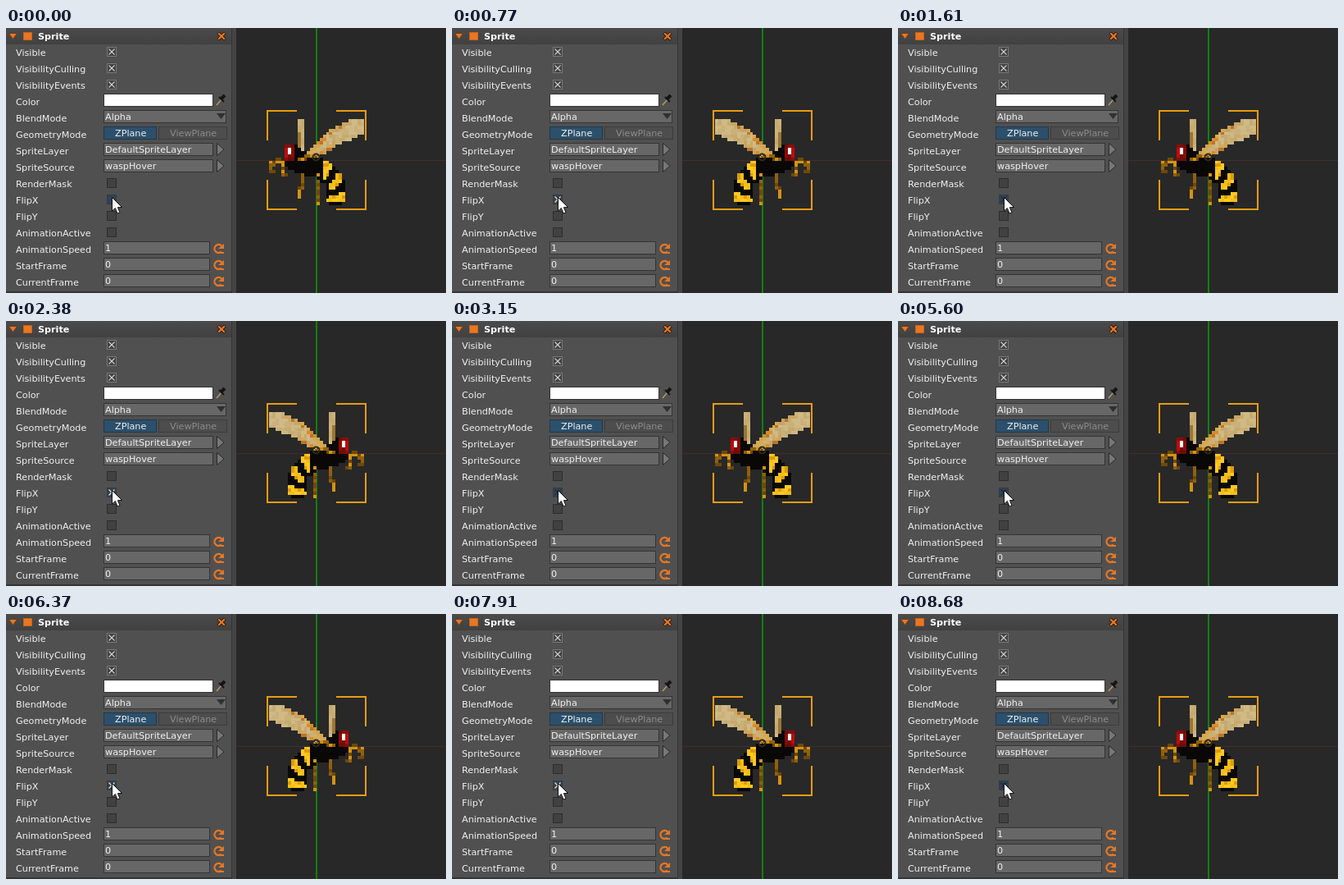
Animation of 537 by 323 pixels, one loop 9.24 s. Source, as an HTML page with a canvas:

```html
<!DOCTYPE html>
<html lang="en">
<head>
<meta charset="utf-8">
<title>Sprite flip</title>
<style>
  html, body { margin: 0; width: 100%; height: 100%; overflow: hidden; background: #282828; }
  canvas { display: block; }
</style>
</head>
<body>
<canvas id="stage" width="537" height="323"></canvas>
<script>
const ctx = document.getElementById('stage').getContext('2d');
const LOOP = 9240;
const TOGGLES = [770, 1610, 2380, 3150, 3990, 5600, 6370, 7140, 7910, 8680];
const ORANGE = '#e87722', DARK = '#343434', FILL = '#676767';
const CENTER = { x: 379, y: 161 };
const ROW = 20, LEFT = 119;

const ROWS = [
  ['Visible', 'check', true],
  ['VisibilityCulling', 'check', true],
  ['VisibilityEvents', 'check', true],
  ['Color', 'color'],
  ['BlendMode', 'menu', 'Alpha'],
  ['GeometryMode', 'choice'],
  ['SpriteLayer', 'link', 'DefaultSpriteLayer'],
  ['SpriteSource', 'link', 'waspHover'],
  ['RenderMask', 'check', false],
  ['FlipX', 'flip'],
  ['FlipY', 'check', false],
  ['AnimationActive', 'check', false],
  ['AnimationSpeed', 'number', '1'],
  ['StartFrame', 'number', '0'],
  ['CurrentFrame', 'number', '0'],
];

function rect(color, x, y, w, h) {
  ctx.fillStyle = color;
  ctx.fillRect(x, y, w, h);
}

function box(border, fill, x, y, w, h) {
  rect(border, x, y, w, h);
  rect(fill, x + 1, y + 1, w - 2, h - 2);
}

function line(color, width, ...points) {
  ctx.beginPath();
  points.forEach(([x, y]) => ctx.lineTo(x, y));
  ctx.strokeStyle = color;
  ctx.lineWidth = width;
  ctx.stroke();
}

function shape(fill, border, ...points) {
  ctx.beginPath();
  points.forEach(([x, y]) => ctx.lineTo(x, y));
  ctx.closePath();
  ctx.fillStyle = fill;
  ctx.fill();
  if (!border) return;
  ctx.strokeStyle = border;
  ctx.lineWidth = 1;
  ctx.stroke();
}

function ring(color, width, x, y, r, from = 0, to = 2 * Math.PI) {
  ctx.beginPath();
  ctx.arc(x, y, r, from, to);
  ctx.strokeStyle = color;
  ctx.lineWidth = width;
  ctx.stroke();
}

function cross(color, width, x, y, r) {
  line(color, width, [x - r, y - r], [x + r, y + r]);
  line(color, width, [x - r, y + r], [x + r, y - r]);
}

function text(string, x, y, color = '#f0f0f0', weight = '') {
  ctx.font = `${weight} 11.2px "DejaVu Sans", sans-serif`;
  ctx.fillStyle = color;
  ctx.fillText(string, x, y);
}

function field(y, w, value) {
  box(DARK, FILL, LEFT, y, w, 16);
  text(value, LEFT + 2, y + 12);
}

const controls = {
  check(y, checked) {
    box(checked ? '#797979' : '#2d2d2d', '#414141', 123, y + 3, 12, 12);
    if (checked) cross('#d0d0d0', 1.1, 129, y + 9, 3.5);
  },
  color(y) {
    box(DARK, '#ffffff', LEFT, y, 134, 16);
    line('#b99762', 1.5, [257, y + 14], [263, y + 7]);
    line('#151515', 4, [262, y + 7], [267, y + 2]);
    line('#151515', 2, [260, y + 4], [266, y + 10]);
  },
  menu(y, value) {
    field(y, 150, value);
    shape('#303030', null, [257, y + 4], [268, y + 4], [262.5, y + 11]);
  },
  choice(y) {
    box('#20384a', '#2c506b', LEFT, y, 65, 16);
    text('ZPlane', 133, y + 12);
    box('#3c3c3c', '#4d4d4d', 186, y, 84, 16);
    text('ViewPlane', 200, y + 12, '#8c8c8c');
  },
  link(y, value) {
    field(y, 134, value);
    shape('#777777', '#292929', [257.5, y + 0.5], [266, y + 8], [257.5, y + 15.5]);
  },
  number(y, value) {
    field(y, 130, value);
    ring(ORANGE, 2.3, 259.5, y + 9, 5, 0.8, 5.6);
    shape(ORANGE, null, [266, y + 3], [266, y + 9], [259, y + 9]);
    rect(ORANGE, 261, y + 13, 5, 2);
  },
  flip(y, { flipped, touched }) {
    box('#343b42', '#304253', 123, y + 3, 12, 12);
    if (flipped) {
      cross('#e6ded0', 1.2, 129, y + 9, 3.5);
      rect('#bd8744', 128, y + 8, 2, 2);
    } else if (touched) {
      cross('#202a34', 1.2, 129, y + 9, 3.5);
    }
  },
};

function drawPanel(state) {
  rect('#505050', 0, 0, 276, 323);
  const header = ctx.createLinearGradient(0, 0, 0, ROW);
  header.addColorStop(0, '#4b4b4b');
  header.addColorStop(1, '#414141');
  rect(header, 0, 0, 276, ROW);
  rect(DARK, 0, 321, 276, 2);
  rect(DARK, 275, 0, 1, 323);
  rect('#444444', 276, 0, 5, 323);

  shape(ORANGE, '#6e3c1b', [3.5, 6.5], [13.5, 6.5], [8.5, 13.5]);
  box('#c7611b', ORANGE, 21, 5, 11, 10);
  text('Sprite', 39, 14, '#ffffff', 'bold');
  cross('#24160c', 4, 263, 10, 4.2);
  cross(ORANGE, 2.3, 263, 10, 3.8);

  ROWS.forEach(([label, kind, value], i) => {
    const y = ROW * (i + 1);
    text(label, 12, y + 14);
    controls[kind](y, kind === 'flip' ? state : value);
  });
}

function drawScene() {
  rect('#282828', 281, 0, 256, 323);
  rect('#442c2c', 281, CENTER.y, 256, 1);
  rect('#108010', CENTER.x - 1, 0, 2, 323);
  for (const sx of [-1, 1]) for (const sy of [-1, 1]) {
    const x = CENTER.x + 60 * sx, y = CENTER.y + 60 * sy;
    line('#e99c12', 2, [x - 36 * sx, y], [x, y], [x, y - 36 * sy]);
  }
}

function seededRandom(seed) {
  return () => (seed = seed * 16807 % 2147483647) / 2147483647;
}

// The wasp is painted with tapered limbs on a small grid, then enlarged unsmoothed.
function makeWasp() {
  const art = document.createElement('canvas');
  art.width = 30;
  art.height = 27;
  const c = art.getContext('2d');
  const random = seededRandom(12);

  function paint(colorAt) {
    for (let y = 0; y < art.height; y++) for (let x = 0; x < art.width; x++) {
      const color = colorAt(x + 0.5, y + 0.5);
      if (!color) continue;
      c.fillStyle = color;
      c.fillRect(x, y, 1, 1);
    }
  }

  function limb(palette, [ax, ay], [bx, by], startRadius, endRadius = startRadius) {
    const dx = bx - ax, dy = by - ay;
    paint((x, y) => {
      const t = ((x - ax) * dx + (y - ay) * dy) / (dx * dx + dy * dy);
      const s = Math.max(0, Math.min(1, t));
      const distance = Math.hypot(x - ax - s * dx, y - ay - s * dy);
      const radius = startRadius + s * (endRadius - startRadius);
      return distance <= radius && palette[Math.floor(random() * palette.length)];
    });
  }

  const black = ['#090806'];
  const wing = ['#cab17a', '#c5ab70', '#d0b985'];
  const vein = ['#d98b2b', '#b7772e', '#caa45f', '#d9a94e'];
  const leg = ['#d49312', '#704809', '#90600c'];
  const yellow = ['#f4bd18', '#ffc922', '#dc9b0c'];

  limb(wing, [10.5, 0], [10, 9], 1);
  limb(['#9b7636'], [9.5, 5], [9.5, 9], 0.5);
  limb(wing, [19, 7], [28, 2], 2.4, 3);
  limb(wing, [13, 12], [19, 7], 1.3, 2.4);
  limb(vein, [12, 11.5], [18, 5], 1, 0.7);
  limb(vein, [18, 5], [24, 1.5], 0.6);
  limb(vein, [14, 12], [21, 8], 0.7);

  // A crescent body banded by angle around its inner bend.
  paint((x, y) => {
    const radius = Math.hypot(x - 13.5, y - 22.5);
    const angle = Math.atan2(y - 22.5, x - 13.5);
    if (radius < 4.7 || radius > 10.5 || angle < -1.6 || angle > 0.6) return null;
    const banded = radius > 5.6 && angle > -1.25 && Math.sin(angle * 10 + radius * 0.6) > -0.1;
    return banded ? yellow[Math.floor(random() * yellow.length)] : black[0];
  });

  limb(black, [8, 10], [13, 15.5], 2, 3);
  limb(black, [5, 14], [11, 16], 1, 2);
  limb(leg, [9, 13], [13, 11.5], 0.6);
  limb(leg, [3.5, 12.5], [1, 14], 0.9);
  limb(leg, [0.5, 14], [1, 16.5], 0.5);
  limb(leg, [4.5, 14], [5, 17.5], 0.6);
  limb(black, [10.5, 17], [10.5, 20], 0.9);
  limb(leg, [10.5, 18], [9.5, 24.5], 0.6);
  limb(leg, [15.5, 18], [15.5, 26], 0.6);
  limb(black, [14, 17], [17, 20], 0.7);
  limb(['#6d0c08', '#8f0a07'], [6.5, 9.5], [6.5, 11.5], 1.6);
  limb(['#c30b0b'], [5.5, 9.5], [5.5, 11.5], 0.6);
  limb(['#ffffff'], [6.5, 9.4], [6.5, 10.6], 0.5);
  return art;
}

function drawWasp(wasp, flipped) {
  ctx.save();
  ctx.translate(CENTER.x, 0);
  ctx.scale(flipped ? -1 : 1, 1);
  ctx.imageSmoothingEnabled = false;
  ctx.drawImage(wasp, -58, 111, 116, 105);
  ctx.restore();
  ring('#302b12', 2, 378.5, 157.5, 4);
  cross('#302b12', 1, 378.5, 157.5, 2.5);
}

function drawCursor() {
  shape('#ffffff', '#101010', [129.5, 206.5], [129.5, 223], [133.3, 219.5], [136, 226],
    [139, 224.8], [136.4, 218.7], [141.5, 218.5]);
}

const wasp = makeWasp();

function frame() {
  const time = performance.now() % LOOP;
  const toggles = TOGGLES.filter(t => t <= time).length;
  const flipped = toggles % 2 === 1;
  drawPanel({ flipped, touched: toggles > 0 });
  drawScene();
  drawWasp(wasp, flipped);
  drawCursor();
  requestAnimationFrame(frame);
}
frame();
</script>
</body>
</html>
```
